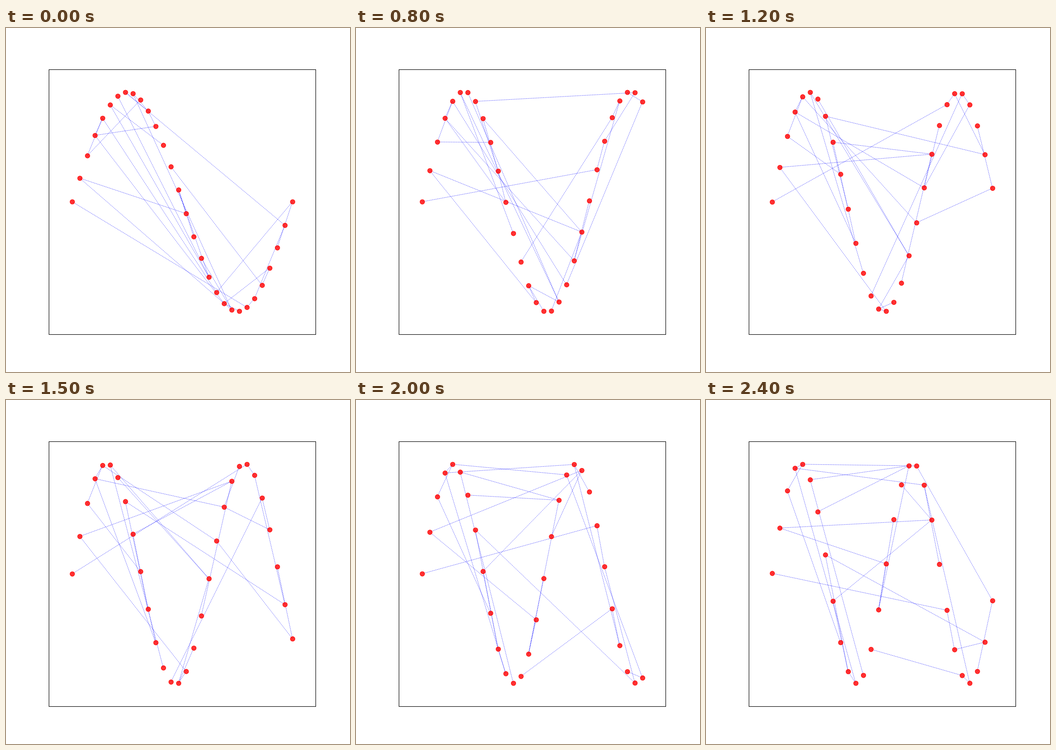
These frames come from a looping animation (748x748 px, 2500 ms). An HTML page with a canvas:

```html
<!DOCTYPE html>
<html lang="en">
<head>
<meta charset="utf-8">
<title>Sine tree</title>
<style>
  html, body { margin: 0; width: 100%; height: 100%; overflow: hidden; background: #fff; }
  canvas { display: block; }
</style>
</head>
<body>
<canvas id="stage" width="748" height="748"></canvas>
<script>
const ctx = document.getElementById("stage").getContext("2d");
const SIZE = 748, NODES = 30, STEPS = 25, STEP_MS = 100;
const PT = 100 / 72;

// Plot area as shares of the stage, padded twice by a twentieth per side
const pad = (from, to) => {
  const mid = (from + to) / 2 * SIZE, half = (to - from) / 2 * SIZE / 1.21;
  return [mid - half, mid + half];
};
const [LEFT, RIGHT] = pad(0.125, 0.9);
const [TOP, BOTTOM] = pad(0.12, 0.89);

// The tree, drawn as walks from node to node
const walks = [
  "0 23 24 28 7 10 11 3 20 26 25 13",
  "6 18 14 15 1 21 8 10",
  "9 2 4 3", "4 19 29 27", "12 5 18",
  "14 16", "17 21", "20 22"
].map(walk => walk.split(" ").map(Number));

// The wave is rescaled in every step to fill the full height
function layout(step) {
  const cycles = 1 + step / STEPS;
  const wave = Array.from({ length: NODES }, (_, i) =>
    Math.sin(2 * Math.PI * cycles * i / (NODES - 1)));
  const max = Math.max(...wave), min = Math.min(...wave);
  return wave.map((v, i) => ({
    x: LEFT + (RIGHT - LEFT) * i / (NODES - 1),
    y: TOP + (BOTTOM - TOP) * (max - v) / (max - min)
  }));
}

function drawLink(a, b) {
  ctx.beginPath();
  ctx.moveTo(a.x, a.y);
  ctx.lineTo(b.x, b.y);
  ctx.stroke();
}

function drawLinks(points) {
  ctx.strokeStyle = "rgba(0, 0, 255, 0.8)";
  ctx.lineWidth = 0.5 * PT;
  ctx.setLineDash([1.85 * PT, 0.8 * PT]);
  for (const walk of walks) {
    for (let i = 1; i < walk.length; i++) {
      const [a, b] = [walk[i - 1], walk[i]].sort((m, n) => m - n);
      drawLink(points[a], points[b]);
    }
  }
  ctx.setLineDash([]);
}

function drawDots(points) {
  ctx.fillStyle = ctx.strokeStyle = "rgba(255, 0, 0, 0.8)";
  ctx.lineWidth = PT;
  for (const { x, y } of points) {
    ctx.beginPath();
    ctx.arc(x + 0.4, y + 0.25, Math.sqrt(50) / 2 * PT, 0, 2 * Math.PI);
    ctx.fill();
    ctx.stroke();
  }
}

function draw(step) {
  const points = layout(step);
  ctx.fillStyle = "#fff";
  ctx.fillRect(0, 0, SIZE, SIZE);
  drawLinks(points);
  drawDots(points);
  ctx.strokeStyle = "#000";
  ctx.lineWidth = 0.8 * PT;
  ctx.strokeRect(93.5, 90.5, 580, 576);
}

let shown = -1;
function tick() {
  const step = Math.floor(performance.now() / STEP_MS) % STEPS;
  if (step !== shown) draw(shown = step);
  requestAnimationFrame(tick);
}
tick();
</script>
</body>
</html>
```
